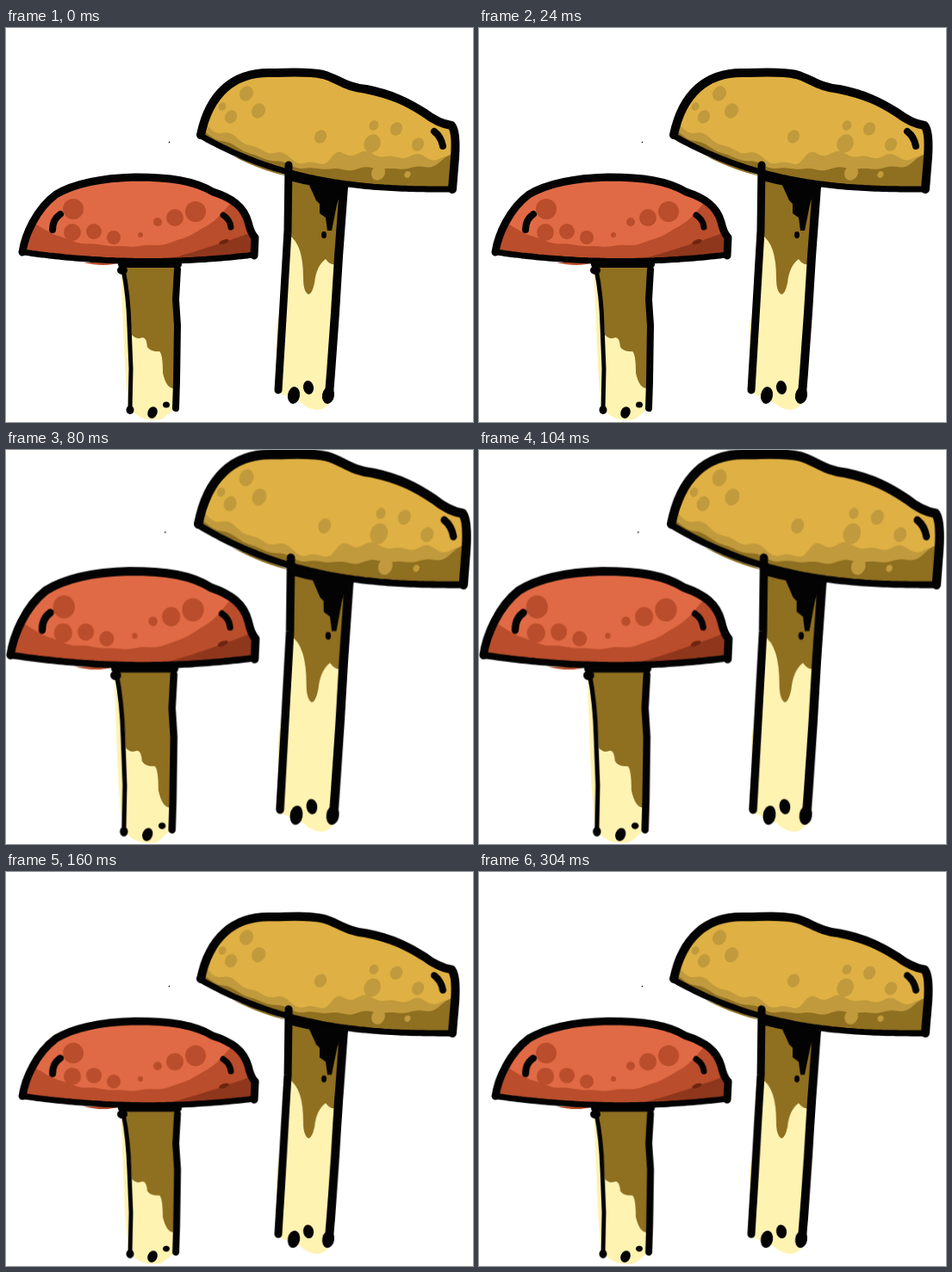
Animation, 542 px wide and 457 px high, one loop 0.4 s. Source, as an HTML page:

```html
<!DOCTYPE html>
<html lang="en">
<head>
<meta charset="utf-8">
<title>Bouncing mushrooms</title>
<style>
  html, body { margin: 0; width: 100%; height: 100%; overflow: hidden; background: #fff; }
  svg { display: block; width: 100%; height: 100%; }
  #art {
    transform-origin: 278px 446px;
    animation: stretch 400ms step-end infinite;
  }
  @keyframes stretch {
    0%, 40%, 100% { transform: scale(1, 1); }
    10% { transform: scale(1.039, 1.086); }
    20% { transform: scale(1.0535, 1.1187); }
    30% { transform: scale(1.021, 1.0455); }
  }
</style>
</head>
<body>
<svg viewBox="0 0 542 457"><g id="art"></g></svg>
<script>
const art = document.getElementById('art');
const INK = '#030303', CREAM = '#fff3b2', BROWN = '#8f6f20';
const GOLD = '#dfb043', GOLD_MID = '#c09a3c';
const RED = '#e06a45', RED_MID = '#ba4d2b', RED_DARK = '#8f371c';

function add(parent, tag, attrs) {
  const el = document.createElementNS('http://www.w3.org/2000/svg', tag);
  for (const k in attrs) el.setAttribute(k, attrs[k]);
  return parent.appendChild(el);
}

const fill = (color, d, parent = art) => add(parent, 'path', { d, fill: color });
const line = (width, d) => add(art, 'path', {
  d, fill: 'none', stroke: INK, 'stroke-width': width,
  'stroke-linecap': 'round', 'stroke-linejoin': 'round'
});
const spot = (parent, color, cx, cy, rx, ry = rx, turn = 0) =>
  add(parent, 'ellipse', { cx, cy, rx, ry, fill: color, transform: `rotate(${turn} ${cx} ${cy})` });

// "x,y x,y ..." points of y = f(x)
function trace(f, from, to) {
  const n = 70, pts = [];
  for (let i = 0; i <= n; i++) {
    const x = from + (to - from) * i / n;
    pts.push(x.toFixed(1) + ',' + f(x).toFixed(1));
  }
  return pts.join(' ');
}

// A cap is a dome above the curve y = base(x); returns its clipped group.
function cap(id, color, dome, base, x0, x1) {
  const d = `${dome} L${trace(base, x1, x0)}Z`;
  fill(d && color, d, add(art, 'clipPath', { id }));
  const g = add(art, 'g', { 'clip-path': `url(#${id})` });
  fill(color, d, g);
  return g;
}

// Shade of the given height above the base of a cap
const shade = (g, color, base, height, x0, x1) =>
  fill(color, `M${trace(x => base(x) - height(x), x0, x1)} L${trace(base, x1, x0)}Z`, g);

function inkCap(dome, base, x0, x1, top, bottom) {
  line(top, dome);
  line(bottom, 'M' + trace(base, x0, x1));
}

const step = (x, at, width) => 1 / (1 + Math.exp((at - x) / width));
const ripple = x => Math.sin(x / 5) + Math.sin(x / 8.3 + 1);

function goldMushroom() {
  fill(CREAM, 'M328 172H392L386 260 382 330 378 430Q372 443 360 443Q348 441 342 434L318 424 314 400 314 345 322 310Z');
  fill(BROWN, 'M328 172H392L386 272Q378 278 371 268Q360 276 358 296Q355 309 351 309Q345 306 345 290Q345 250 328 240Z');
  fill(BROWN, 'M262 148L328 172Q300 167 262 148Z');

  const x0 = 226, x1 = 518;
  const base = x => 187 - 62 * ((x1 - x) / (x1 - x0)) ** 2.67;
  const dome = 'M226 124C236 76 264 52 305 52C330 52 350 50 368 54C384 58 394 69 418 71C448 77 466 86 485 98Q502 111 517 113Q523 120 521 150L518 187';
  const g = cap('gold', GOLD, dome, base, x0, x1);
  shade(g, GOLD_MID, base, x => 17 + 20 * step(x, 378, 4) + 2 * ripple(x), x0, x1);
  shade(g, BROWN, base, x => 7 + 17 * step(x, 385, 25) + 20 * step(x, 506, 8) + ripple(x), x0, x1);

  for (const [x, y, r] of [[279, 76, 9], [293, 96, 9], [261, 103, 8], [251, 91, 5],
    [365, 126, 8], [427, 113, 6], [453, 117, 8], [478, 135, 8], [425, 134, 11], [432, 168, 9], [466, 170, 4]])
    spot(g, GOLD_MID, x, y, r * 0.85, r, 30);

  inkCap(dome, base, x0, x1, 10, 7);
  line(8, 'M497 120Q505 126 507 137');

  line(9, 'M328 159L327 235 322 320 316 420');
  line(10, 'M392 184L386 265 382 330 377 400 375 425');
  line(9, 'M331 173Q360 181 393 183');
  fill(INK, 'M350 178H392L384 205 378 235H373L371 220 364 215V204L360 200Z');
  spot(art, INK, 369, 240, 3, 4);
  spot(art, INK, 334, 426, 7, 10, 10);
  spot(art, INK, 351, 417, 6, 8, -10);
  spot(art, INK, 374, 426, 7, 10, 10);
}

function redMushroom() {
  fill(CREAM, 'M133 277H200L197 440Q188 449 180 454Q162 457 150 448L142 440 138 395Z');
  fill(BROWN, 'M133 277H201L196 418Q186 419 182 400Q182 378 178 375Q168 376 164 370Q163 358 158 359Q152 362 146 356L142 310Z');

  const x0 = 19, x1 = 288;
  const base = x => 270.5 - 0.0005 * (x - 165) ** 2;
  const dome = 'M19 260C22 240 35 210 58 193C80 180 110 174 150 173C190 173 218 177 240 190C262 197 276 207 281 225Q284 238 289 243L288 264';
  const g = cap('red', RED, dome, base, x0, x1);
  shade(g, RED_MID, base, x => 17 + 55 * Math.abs((x - 130) / 140) ** 3 + ripple(x) / 2, x0, x1);
  shade(g, RED_DARK, base, x => 0.25 * (x - 180), 180, x1);

  for (const [x, y, r] of [[78, 210, 12], [77, 237, 10], [102, 236, 9], [125, 243, 8],
    [196, 220, 10], [220, 213, 12], [176, 225, 5], [156, 240, 3]])
    spot(g, RED_MID, x, y, r);
  spot(g, '#6d2510', 253, 248, 6, 2.5, -20);

  fill(RED_MID, 'M90 272H132Q115 278 90 272Z');
  inkCap(dome, base, x0, x1, 9, 7);
  line(8, 'M63 216Q54 222 54 234');
  line(7, 'M252 217Q260 222 261 231');

  line(8, 'M134 274H200');
  line(5, 'M136 280Q142 310 143 345L145 395 144 442');
  line(8, 'M199 280L197 315 199 345 198 410 197 441');
  spot(art, INK, 135, 281, 6, 5);
  spot(art, INK, 144, 443, 4.5, 5);
  spot(art, INK, 170, 446, 5.5, 7, 25);
  spot(art, INK, 186, 437, 4, 3.5);
}

goldMushroom();
redMushroom();
spot(art, INK, 189.5, 132.5, 0.8);
</script>
</body>
</html>
```
